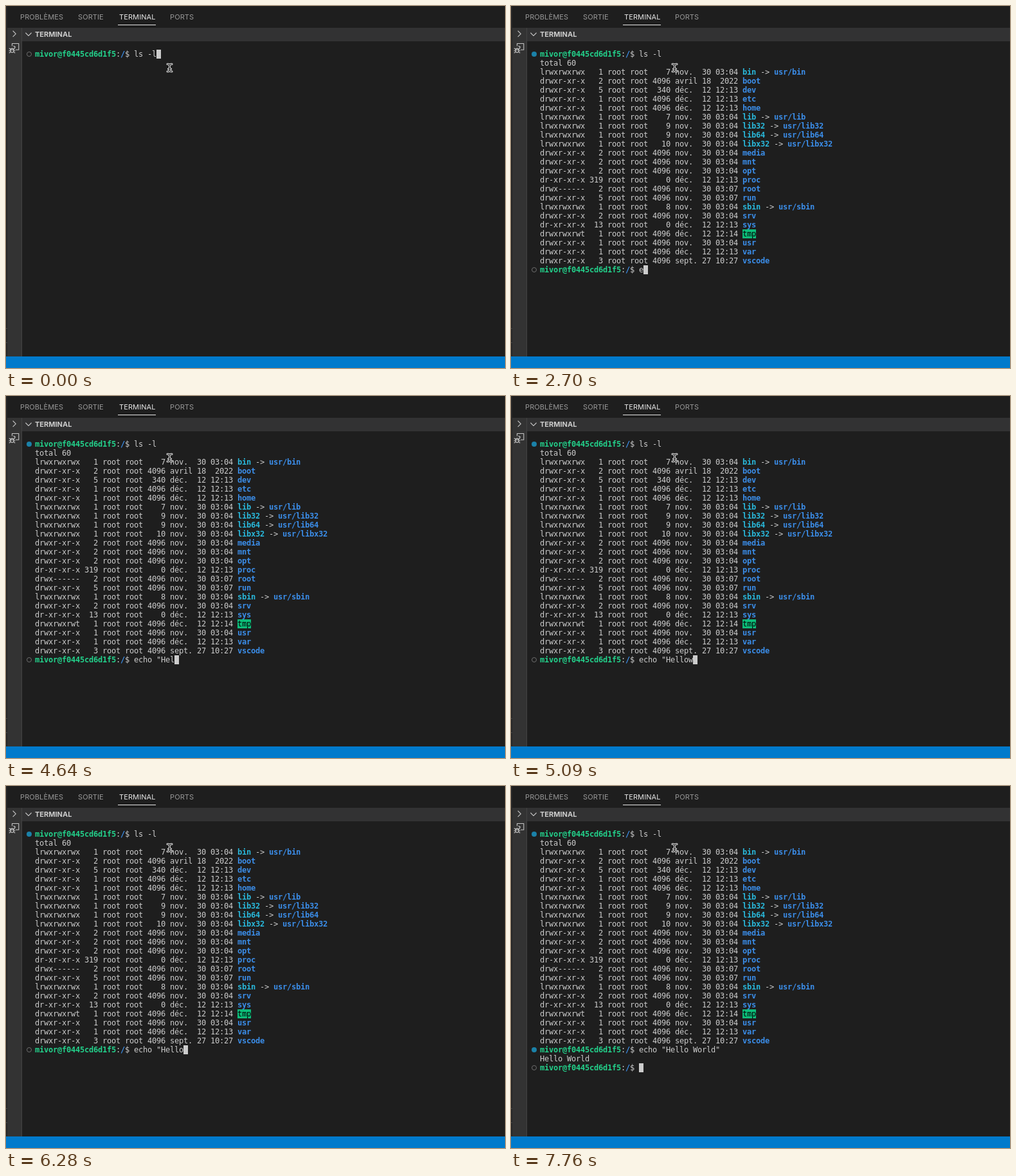
An HTML page for the animation above (8 s loop, 776x564 px).

```html
<!DOCTYPE html>
<html lang="fr">
<head>
<meta charset="utf-8">
<title>Terminal</title>
<style>
  html, body { margin: 0; width: 100%; height: 100%; overflow: hidden; background: #1e1e1e; }
  #stage { position: relative; width: 776px; height: 564px; overflow: hidden; background: #1e1e1e; }
  #stage > * { position: absolute; }
  .edge { left: 0; top: 0; width: 2px; height: 546px; background: #252526; }
  .edge::before { content: ""; position: absolute; top: 502px; width: 2px; height: 21px; border: solid #454545; border-width: 1px 0; }
  .rail { left: 2px; top: 34px; width: 22px; height: 512px; background: #333; border-right: 1px solid #424242; }
  .header { left: 25px; top: 34px; width: 751px; height: 21px; background: #323233; }
  .status { left: 0; top: 546px; width: 776px; height: 18px; background: #007acc; }
  .label { font: 11px/16px Inter, "Open Sans", sans-serif; letter-spacing: .1px; color: #989898; white-space: pre; }
  .tab { top: 9px; }
  .active { color: #e7e7e7; }
  .active::after { content: ""; position: absolute; left: -2px; top: 20px; width: 59px; height: 1px; background: #e7e7e7; }
  .heading { left: 45px; top: 36px; font-weight: 700; letter-spacing: 0; color: #ccc; }
  #screen {
    left: 45px; top: 68px; color: #ccc; white-space: pre;
    font: 12px/14px "DejaVu Sans Mono", monospace;
    letter-spacing: calc(7px - 1ch);
    font-variant-ligatures: none;
  }
  .row { position: relative; height: 14px; }
  .user { color: #23d18b; font-weight: 700; }
  .dir { color: #3b8eea; font-weight: 700; }
  .link { color: #29b8db; font-weight: 700; }
  .sticky { display: inline-block; height: 14px; vertical-align: top; background: #0dbc79; color: #000; }
  .cursor { display: inline-block; width: 7px; height: 14px; vertical-align: top; background: #ccc; }
  .mark { position: absolute; left: -13px; top: 3px; box-sizing: border-box; width: 8px; height: 8px; border-radius: 50%; border: 1.2px solid #6e6e6e; }
  .done { border: 0; background: #1b81a8; }
  svg { left: 0; top: 0; fill: none; stroke-linecap: round; stroke-linejoin: round; }
</style>
</head>
<body>
<div id="stage">
  <div class="edge"></div>
  <div class="rail"></div>
  <div class="header"></div>
  <div class="status"></div>
  <div class="label tab" style="left:22px">PROBLÈMES</div>
  <div class="label tab" style="left:112px">SORTIE</div>
  <div class="label tab active" style="left:176px">TERMINAL</div>
  <div class="label tab" style="left:255px">PORTS</div>
  <div class="label heading">TERMINAL</div>
  <div id="screen"></div>
  <svg width="776" height="564">
    <g stroke="#c5c5c5" stroke-width="1.1">
      <path d="M11 39l4.3 4.3-4.3 4.3M30.7 42l4.3 4.3 4.3-4.3"/>
      <path d="M9.5 62v-3.5h10.3v9.8h-4.300M11.800 62.300l2.700 1.700-1.500 1"/>
      <ellipse cx="9.500" cy="69.300" rx="2.500" ry="3.200"/>
      <path d="M7 68.300h5M5.200 66l1.900 1.200M13.800 66l-1.900 1.200M5 69.700h2M12 69.700h2M5.200 73l1.900-1.400M13.800 73l-1.900-1.400"/>
    </g>
    <defs>
      <path id="beam" d="M251 90.500q3.500 0 3.500 2.500q0-2.500 3.500-2.500M254.500 93v7M252.500 98h4M251 102q3.500 0 3.500-2.500q0 2.500 3.500 2.500"/>
    </defs>
    <use href="#beam" stroke="#f0f0f0" stroke-width="3"/>
    <use href="#beam" stroke="#111" stroke-width="1.100"/>
  </svg>
</div>
<script>
const LOOP = 8000, LISTED = 150, ECHOED = 7760;

const LISTING = `lrwxrwxrwx   1 root root    7 nov.  30 03:04 bin -> usr/bin
drwxr-xr-x   2 root root 4096 avril 18  2022 boot
drwxr-xr-x   5 root root  340 déc.  12 12:13 dev
drwxr-xr-x   1 root root 4096 déc.  12 12:13 etc
drwxr-xr-x   1 root root 4096 déc.  12 12:13 home
lrwxrwxrwx   1 root root    7 nov.  30 03:04 lib -> usr/lib
lrwxrwxrwx   1 root root    9 nov.  30 03:04 lib32 -> usr/lib32
lrwxrwxrwx   1 root root    9 nov.  30 03:04 lib64 -> usr/lib64
lrwxrwxrwx   1 root root   10 nov.  30 03:04 libx32 -> usr/libx32
drwxr-xr-x   2 root root 4096 nov.  30 03:04 media
drwxr-xr-x   2 root root 4096 nov.  30 03:04 mnt
drwxr-xr-x   2 root root 4096 nov.  30 03:04 opt
dr-xr-xr-x 319 root root    0 déc.  12 12:13 proc
drwx------   2 root root 4096 nov.  30 03:07 root
drwxr-xr-x   5 root root 4096 nov.  30 03:07 run
lrwxrwxrwx   1 root root    8 nov.  30 03:04 sbin -> usr/sbin
drwxr-xr-x   2 root root 4096 nov.  30 03:04 srv
dr-xr-xr-x  13 root root    0 déc.  12 12:13 sys
drwxrwxrwt   1 root root 4096 déc.  12 12:14 tmp
drwxr-xr-x   1 root root 4096 nov.  30 03:04 usr
drwxr-xr-x   1 root root 4096 déc.  12 12:13 var
drwxr-xr-x   3 root root 4096 sept. 27 10:27 vscode`;

// Command line contents from each moment on.
const TYPING = [
  [150, ''], [2700, 'e'], [3000, 'ech'], [3590, 'echo'], [3740, 'echo "'],
  [4490, 'echo "He'], [4640, 'echo "Hel'], [4790, 'echo "Hell'], [4940, 'echo "Hello'],
  [5090, 'echo "Hellow'], [5240, 'echo "Hellowo'], [5530, 'echo "Hellowor'],
  [5980, 'echo "Hellowo'], [6130, 'echo "Hellow'], [6280, 'echo "Hello'],
  [6430, 'echo "Hello '], [6720, 'echo "Hello W'], [6870, 'echo "Hello Wo'],
  [7020, 'echo "Hello Wor'], [7160, 'echo "Hello Worl'], [7310, 'echo "Hello World'],
  [7460, 'echo "Hello World"']
];

const span = (cls, text = '') => `<span class="${cls}">${text}</span>`;
const row = html => `<div class="row">${html}</div>`;

function prompt(command, done) {
  return row(span(done ? 'mark done' : 'mark') + span('user', 'mivor@f0445cd6d1f5') + ':' +
    span('dir', '/') + '$ ' + command + (done ? '' : span('cursor')));
}

function entry(line) {
  const [name, target] = line.slice(45).split(' -> ');
  const kind = line[0] === 'l' ? 'link' : line[9] === 't' ? 'sticky' : 'dir';
  return row(line.slice(0, 45) + span(kind, name) + (target ? ' -&gt; ' + span('dir', target) : ''));
}

const listed = prompt('ls -l', true) + row('total 60') + LISTING.split('\n').map(entry).join('');
const echoed = listed + prompt('echo "Hello World"', true) + row('Hello World') + prompt('');

function contentAt(time) {
  if (time < LISTED) return prompt('ls -l');
  if (time >= ECHOED) return echoed;
  return listed + prompt(TYPING.filter(([start]) => start <= time).pop()[1]);
}

const screen = document.getElementById('screen');
const begin = performance.now();
let shown = '';

function draw() {
  const content = contentAt((performance.now() - begin) % LOOP);
  if (content !== shown) screen.innerHTML = shown = content;
  requestAnimationFrame(draw);
}
draw();
</script>
</body>
</html>
```
